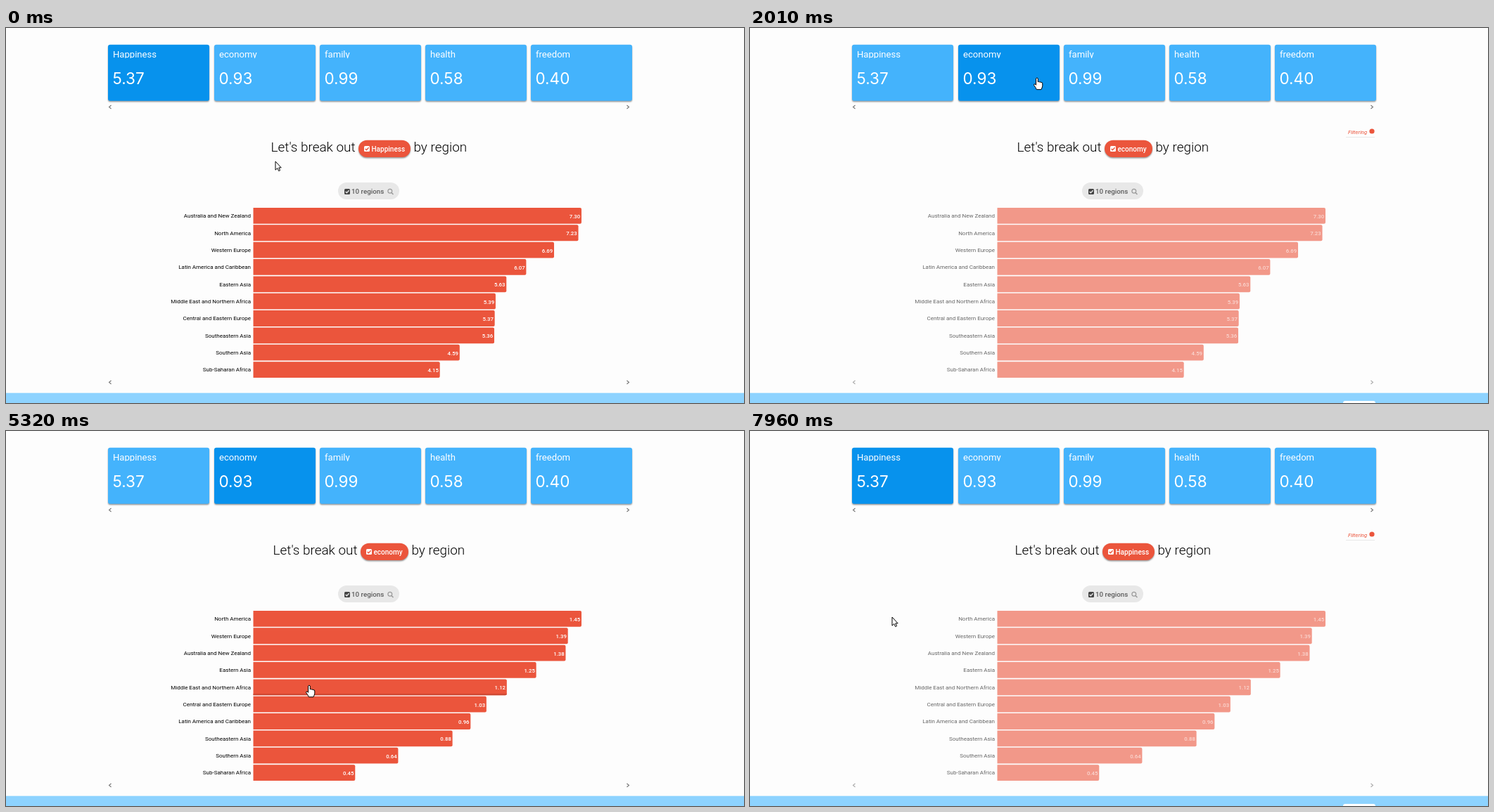
An HTML page with a canvas that plays this animation: 1049x534 px, repeating every 8000 ms.

```html
<!DOCTYPE html>
<html lang="en">
<head>
<meta charset="utf-8">
<title>Happiness by region</title>
<style>
html, body { margin: 0; width: 100%; height: 100%; overflow: hidden; background: #fdfdfd; }
canvas { display: block; }
</style>
</head>
<body>
<canvas id="stage" width="1049" height="534"></canvas>
<script>
const ctx = document.getElementById('stage').getContext('2d');
const RED = '#eb553c';
const LOOP = 8000;

// Moments when a card is picked and when its data arrives
const PICK_ECONOMY = 1690, DATA_READY = 3950, PICK_HAPPINESS = 6870;

const cards = { Happiness: '5.37', economy: '0.93', family: '0.99', health: '0.58', freedom: '0.40' };

// Region: [happiness, economy]
const regions = {
  'Australia and New Zealand': [7.30, 1.38],
  'North America': [7.23, 1.45],
  'Western Europe': [6.69, 1.39],
  'Latin America and Caribbean': [6.07, 0.96],
  'Eastern Asia': [5.63, 1.25],
  'Middle East and Northern Africa': [5.39, 1.12],
  'Central and Eastern Europe': [5.37, 1.03],
  'Southeastern Asia': [5.36, 0.88],
  'Southern Asia': [4.59, 0.64],
  'Sub-Saharan Africa': [4.15, 0.45]
};

// Stops of the pointer tip: time, x, y
const stops = [[0, 383, 190], [600, 262, 92], [1100, 388, 57], [1740, 388, 57], [2880, 528, 154], [3300, 602, 198],
  [3840, 470, 140], [4110, 457, 173], [4620, 426, 346], [5320, 431, 362], [6010, 247, 207], [6800, 222, 79],
  [7960, 202, 265]];

const ramp = (t, start, span) => Math.min(1, Math.max(0, (t - start) / span));
const smooth = k => k * k * (3 - 2 * k);
const mix = (a, b, k) => a + (b - a) * k;

function pointerAt(t) {
  const next = stops.findIndex(s => s[0] > t);
  if (next < 0) return stops.at(-1).slice(1);
  const [t0, x0, y0] = stops[next - 1], [t1, x1, y1] = stops[next];
  const k = smooth(ramp(t, t0, t1 - t0));
  return [mix(x0, x1, k), mix(y0, y1, k)];
}

function text(str, x, y, font, color, align = 'left') {
  ctx.font = font + ', sans-serif';
  ctx.fillStyle = color;
  ctx.textAlign = align;
  ctx.fillText(str, x, y);
}

function box(x, y, w, h, r, color, shadow = 0) {
  ctx.save();
  ctx.shadowColor = `rgba(0,0,0,${shadow})`;
  ctx.shadowBlur = 2;
  ctx.shadowOffsetY = 1.5;
  ctx.fillStyle = color;
  ctx.beginPath();
  ctx.roundRect(x, y, w, h, r);
  ctx.fill();
  ctx.restore();
}

function line(points, color, width) {
  ctx.strokeStyle = color;
  ctx.lineWidth = width;
  ctx.beginPath();
  points.forEach(([x, y]) => ctx.lineTo(x, y));
  ctx.stroke();
}

function circle(x, y, r) {
  ctx.beginPath();
  ctx.arc(x, y, r, 0, 7);
}

function arrows(y) {
  for (const [x, d] of [[148, 1.5], [884, -1.5]]) {
    line([[x + d, y - 2.5], [x - d, y], [x + d, y + 2.5]], '#777', 1.1);
  }
}

function checkbox(x, y, fill, tick) {
  box(x, y, 8, 8, 1.5, fill);
  line([[x + 1.7, y + 4], [x + 3.4, y + 5.8], [x + 6.6, y + 2.3]], tick, 1.4);
}

function drawCards(levels) {
  Object.entries(cards).forEach(([name, value], i) => {
    const x = Math.ceil(145 + 150.2 * i), k = levels[i] || 0;
    box(x, 23.7, 144, 80.1, 3, `rgb(${mix(68, 7, k)},${mix(179, 146, k)},${mix(252, 237, k)})`, 0.4);
    ctx.save();
    ctx.beginPath();
    ctx.rect(x, 24, 144, 19);
    ctx.clip();
    text(name, x + 7, 42, '13.1px Roboto', '#fff');
    ctx.restore();
    text(value, x + 6.5, 80, '22.5px Inter', '#fff');
  });
  arrows(112.5);
}

function drawHeading(measure) {
  const font = '300 18.9px Roboto';
  const half = measure === 'economy' ? 34 : 37;
  text("Let's break out", 538 - half - 4.5, 176, font, '#000', 'right');
  text('by region', 538 + half + 4.5, 176, font, '#000');
  box(538 - half, 159.7, 2 * half, 24.2, 12, RED, 0.4);
  checkbox(546 - half, 168, '#fff', RED);
  text(measure, 556.5 - half, 175.5, '500 10px Roboto', '#fff');
}

function drawFilter() {
  box(472, 220, 87, 24, 12, '#e8e8e8');
  checkbox(481, 229, '#444', '#e8e8e8');
  text('10 regions', 491, 236.3, '500 9.8px Roboto', '#5c5c5c');
  ctx.strokeStyle = '#999';
  ctx.lineWidth = 1.2;
  circle(545.8, 232.3, 2.9);
  ctx.stroke();
  line([[548, 234.5], [550.5, 237]], '#999', 1.5);
}

function drawBars(column, alpha, [px, py]) {
  const rows = Object.entries(regions).map(([name, v]) => [name, v[column]]).sort((a, b) => b[1] - a[1]);
  ctx.globalAlpha = alpha;
  rows.forEach(([name, v], i) => {
    const x = 351.5, y = 256 + 24.35 * i, w = 466.5 * v / rows[0][1], h = 22.8;
    box(x, y, w, h, [0, 2, 2, 0], RED);
    if (px > x && px < x + w && py > y && py < y + h) box(x, y + h - 2, w, 2, [0, 0, 2, 0], '#cb4630');
    text(name, 348, y + 14.3, '8px Roboto', '#000', 'right');
    text(v.toFixed(2), x + w - 1.8, y + 14.8, '500 7.8px Roboto', '#fff', 'right');
  });
  arrows(504.5);
  ctx.globalAlpha = 1;
}

function drawToast(alpha) {
  ctx.globalAlpha = alpha;
  text('Filtering', 850, 151, 'italic 7.8px Roboto', RED);
  ctx.fillStyle = RED;
  circle(884, 147, 3.6);
  ctx.fill();
  line([[847, 155.5], [888, 155.5]], '#e8e8e8', 1);
  box(843, 531, 46, 8, 3, '#fff');
  ctx.globalAlpha = 1;
}

const arrowShape = new Path2D('M0 0V12.2L2.8 9.6L4.7 13.6L6.6 12.7L4.8 8.9H8.2Z');
const handShape = new Path2D('M-1.4 1Q0-.8 1.3 1V6Q2.6 4.9 3.8 6.3Q5 5.4 6 6.8Q7.6 6.2 7.8 8V11.5Q7.4 14 6 16.8H-.6Q-2 13.4-4.4 10.6Q-4.6 8.6-2.8 9L-1.4 10.4Z');

function drawPointer([x, y]) {
  const within = (left, top, right, bottom) => x > left && x < right && y > top && y < bottom;
  const clickable = within(145, 24, 890, 104) || within(502, 160, 574, 184) || within(352, 256, 620, 498);
  ctx.save();
  ctx.translate(x, y);
  if (!clickable && within(376, 159, 656, 184)) {
    for (const end of [-6.5, 6.5]) line([[-2.5, end], [2.5, end]], '#000', 1);
    line([[0, -6], [0, 6]], '#000', 1);
  } else {
    const shape = clickable ? handShape : arrowShape;
    ctx.fillStyle = '#fff';
    ctx.strokeStyle = '#000';
    ctx.lineWidth = 1;
    ctx.lineJoin = 'round';
    ctx.fill(shape);
    ctx.stroke(shape);
  }
  ctx.restore();
}

function draw(t) {
  const pointer = pointerAt(t);
  const picked = ramp(t, PICK_ECONOMY, 300) + ramp(t, PICK_HAPPINESS, 300);
  const busy = picked - ramp(t, DATA_READY - 50, 200);
  const toast = picked - ramp(t, DATA_READY + 130, 350);
  const first = 1 - ramp(t, PICK_ECONOMY - 50, 200) + ramp(t, 6400, 250);
  const second = ramp(t, 800, 200) - ramp(t, PICK_HAPPINESS + 30, 250);
  const onEconomy = t >= PICK_ECONOMY && t < PICK_HAPPINESS;

  ctx.fillStyle = '#fdfdfd';
  ctx.fillRect(0, 0, 1049, 534);
  ctx.fillStyle = '#8dd3ff';
  ctx.fillRect(0, 519.7, 1049, 15);
  drawCards([first, second]);
  drawHeading(onEconomy ? 'economy' : 'Happiness');
  drawFilter();
  drawBars(t >= DATA_READY ? 1 : 0, 1 - 0.4 * busy, pointer);
  drawToast(toast);
  drawPointer(pointer);
}

const begin = performance.now();
(function tick() {
  draw((performance.now() - begin) % LOOP);
  requestAnimationFrame(tick);
})();
</script>
</body>
</html>
```
